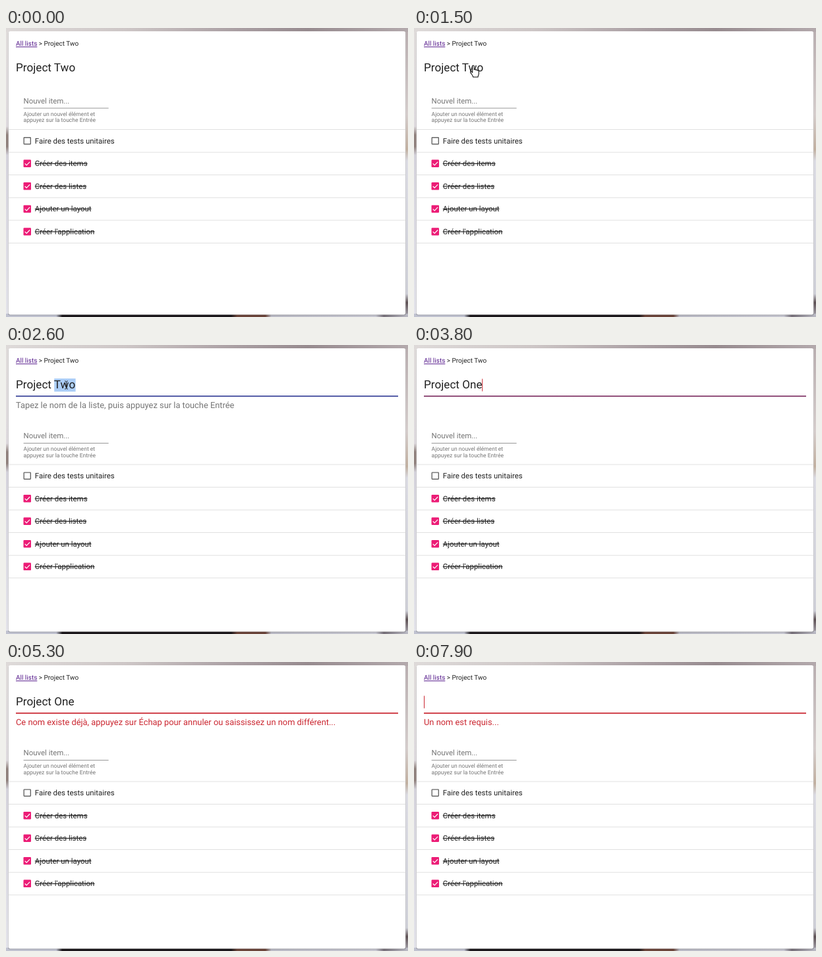
An HTML page that plays this animation: 610x440 px, repeating every 8 s.

```html
<!DOCTYPE html>
<html lang="fr">
<head>
<meta charset="utf-8">
<title>Liste</title>
<style>
html, body { margin: 0; width: 100%; height: 100%; overflow: hidden; }
svg {
  display: block; width: 100vw; height: 100vh;
  background:
    linear-gradient(90deg, #dedad9, #cdc6c6 30%, #a99ea2 58%, #978b8f 75%, #b3a9ac) 0 0 / 100% 6px no-repeat,
    linear-gradient(90deg, #c0c2d0 0 12.5%, #1b171b 14% 56%, #6b4439 57.5% 64.5%, #b9b9c4 66%, #c6c6d0 92%, #77707a 94%, #bcbcc6) 0 100% / 100% 5px no-repeat,
    linear-gradient(#e0dcdb, #dedade 34%, #91827e 37% 41%, #d5d3dc 44%, #e3e3ea) 0 0 / 8px 100% no-repeat,
    linear-gradient(#b9aeb0, #d6cecd 30%, #c2b0a0 42%, #dcdce4 46%, #cfd0d8 92%, #5d5053 95%, #b0aeb8) 100% 0 / 8px 100% no-repeat;
}
text { font-family: Roboto, sans-serif; fill: #212121; white-space: pre; text-rendering: geometricPrecision; }
.small { font-size: 10px; }
.title { font-size: 17.14px; }
.msg { font-size: 12.86px; }
.item { font-size: 11.43px; }
.tip { font-size: 8.57px; fill: #757575; }
.grey { fill: #757575; }
.done { text-decoration: line-through; }
</style>
</head>
<body>
<svg id="stage" viewBox="0 0 610 440" preserveAspectRatio="none">
  <rect x="3.2" y="5.6" width="603.6" height="432" rx="3" fill="#000" opacity=".22"/>
  <rect x="3.7" y="5" width="602.6" height="431.4" rx="2.8" fill="#fff"/>

  <text class="small" x="15" y="27.3"><tspan fill="#551a8b" text-decoration="underline">All lists</tspan> &gt; Project Two</text>

  <rect id="select" y="51" height="20" fill="#accef7"/>
  <text id="title" class="title" x="15" y="66"></text>
  <rect id="caret" y="51.5" width="1" height="19"/>

  <g id="field">
    <rect x="15" y="77.2" width="580" height="1" fill="#949494"/>
    <rect id="ripple" y="77" height="1.7"/>
    <text id="hint" class="msg grey" x="15">Tapez le nom de la liste, puis appuyez sur la touche Entrée</text>
    <text id="error" class="msg" x="15" style="fill:#cb2731"></text>
  </g>

  <g id="list">
    <text class="item grey" x="26.6" y="114.6">Nouvel item...</text>
    <rect x="26.6" y="121.6" width="129" height=".9" fill="#8c8c8c"/>
    <text class="tip" x="26.6" y="133.7">Ajouter un nouvel élément et</text>
    <text class="tip" x="26.6" y="143.2">appuyez sur la touche Entrée</text>
  </g>

  <path id="arrow" d="M0 0V13L3 10.2L5 14.8L7.2 13.9L5.2 9.4H9.4Z" fill="#000" stroke="#fff" stroke-width=".8"/>
  <path id="hand" d="M-1.3 .8C-1.3 -.9 1.3 -.9 1.3 .8V6C2 5.2 3.5 5.4 3.8 6.5C4.6 5.8 6 6.1 6.2 7.3C7.3 6.8 8.3 7.3 8.3 8.5V12C8.3 14 7 15 7 17.3H-.2C-.6 15 -2.2 13.6 -4.2 10.4C-5 9 -3.4 8 -2.4 9.2L-1.3 10.4Z" fill="#fff" stroke="#111" stroke-width="1.1" stroke-linejoin="round"/>
  <path id="beam" d="M-2.4 -6C-1 -6 0 -5.6 0 -4.6C0 -5.6 1 -6 2.4 -6M0 -4.6V4.6M-2.4 6C-1 6 0 5.6 0 4.6C0 5.6 1 6 2.4 6M-1.4 1.8H1.4" fill="none" stroke="#222" stroke-width="1"/>
</svg>
<script>
const LOOP = 8000, LEFT = 15, RIGHT = 595;
const EDIT = 1550, FOCUS = 1660, PICK = 2320;
const INDIGO = [60, 70, 156], RED = [205, 40, 50];
const OLD = 'Project Two', NEW = 'Project One';
const TAKEN = 'Ce nom existe déjà, appuyez sur Échap pour annuler ou saississez un nom différent...';
const EMPTY = 'Un nom est requis...';

// Keystrokes: [time, resulting text]
const keys = [[3350, 'Project O'], [3550, 'Project On'], [3750, NEW], [5850, NEW.slice(0, -1)]];
for (let n = 9; n >= 0; n--) keys.push([6250 + (9 - n) * 44, NEW.slice(0, n)]);
const TYPED = keys[0][0], CLASH = keys[2][0], CLEAR = keys[3][0], BLANK = keys[keys.length - 1][0];

// Pointer path: [time, x, y]
const path = [[100, 318, 442], [480, 248, 258], [680, 248, 258], [1020, 90, 57.5]];

const $ = id => document.getElementById(id);
const clamp = v => Math.max(0, Math.min(1, v));
const part = (t, start, span = 300) => clamp((t - start) / span);
const easeOut = p => 1 - (1 - p) ** 3.6;
const easeIn = p => p ** 3;
const mix = (a, b, p) => a + (b - a) * p;
const set = (el, attrs) => { for (const k in attrs) el.setAttribute(k, attrs[k]); };
const show = (el, on) => set(el, { visibility: on ? 'visible' : 'hidden' });

function add(parent, tag, attrs, text = '') {
  const el = document.createElementNS('http://www.w3.org/2000/svg', tag);
  set(el, attrs);
  el.textContent = text;
  parent.append(el);
}

const items = ['Faire des tests unitaires', 'Créer des items', 'Créer des listes', 'Ajouter un layout', "Créer l'application"];

function buildList() {
  const list = $('list'), pitch = 34.55;
  for (let i = 0; i <= items.length; i++)
    add(list, 'rect', { x: 3.7, y: 154.2 + i * pitch, width: 602.6, height: .8, fill: '#d9d9d9' });
  items.forEach((name, i) => {
    const y = 166 + i * pitch;
    if (i) {
      add(list, 'rect', { x: 26.5, y, width: 11.5, height: 11.5, rx: 1.2, fill: '#ec1c76' });
      add(list, 'path', { d: `M28.7 ${y + 5.9}l2.5 2.5l4.9 -5.1`, fill: 'none', stroke: '#fff', 'stroke-width': 1.2 });
    } else {
      add(list, 'rect', { x: 27.2, y: y + .7, width: 10.1, height: 10.1, rx: .6, fill: 'none', stroke: '#666', 'stroke-width': 1.4 });
    }
    add(list, 'text', { x: 43.8, y: y + 9.6, class: i ? 'item done' : 'item' }, name);
  });
}

function textWidth(text) {
  $('title').textContent = text;
  return text ? $('title').getComputedTextLength() : 0;
}

function pointer(t) {
  let i = 0;
  while (i < path.length - 2 && t >= path[i + 1][0]) i++;
  const [a, b] = [path[i], path[i + 1]];
  const p = part(t, a[0], b[0] - a[0]), s = p * p * (3 - 2 * p);
  return [mix(a[1], b[1], s), mix(a[2], b[2], s)];
}

function drawPointer(t) {
  const [x, y] = pointer(t), over = y < 80;
  set($('arrow'), { transform: `translate(${x} ${y})` });
  set($('hand'), { transform: `translate(${x} ${y})` });
  set($('beam'), { transform: 'translate(91.5 61)' });
  show($('arrow'), t >= 100 && t < EDIT && !over);
  show($('hand'), t < EDIT && over);
  show($('beam'), t >= EDIT && t < TYPED);
}

function drawMessage(el, p) {
  const k = easeIn(p);
  set(el, { y: 96.3 - 14 * (1 - k), opacity: k });
}

function draw(t) {
  const editing = t >= EDIT, focused = t >= FOCUS;
  const key = keys.filter(k => k[0] <= t).pop();
  const text = key ? key[1] : OLD;

  show($('field'), editing);
  set($('list'), { transform: `translate(0 ${editing ? 27.4 : 0})` });

  // Focus line grows from the middle and turns red on an error
  const grow = focused ? mix(.5, 1, easeOut(part(t, FOCUS))) : 0;
  const wrong = easeOut(part(t, CLASH)) - easeOut(part(t, CLEAR)) + easeOut(part(t, BLANK));
  const color = `rgb(${INDIGO.map((v, i) => Math.round(mix(v, RED[i], wrong)))})`;
  const half = (RIGHT - LEFT) / 2 * grow;
  set($('ripple'), { x: (LEFT + RIGHT) / 2 - half, width: 2 * half, fill: color, opacity: part(t, FOCUS, 100) });

  const bad = t >= BLANK || (t >= CLASH && t < CLEAR);
  $('error').textContent = t >= BLANK ? EMPTY : TAKEN;
  drawMessage($('error'), bad ? part(t, t >= BLANK ? BLANK : CLASH) : 0);
  drawMessage($('hint'), bad ? 0 : t < CLASH ? 1 : part(t, CLEAR));

  const picked = t >= PICK && t < TYPED;
  const from = textWidth('Project ');
  set($('select'), { x: LEFT + from, width: textWidth('Two') });
  show($('select'), picked);

  // Caret restarts its blink at every keystroke
  const since = t - (key ? key[0] : FOCUS);
  const at = textWidth(key ? text : 'Project Tw');
  set($('caret'), { x: LEFT + Math.max(0, at - .3), fill: bad ? '#cb2731' : color });
  show($('caret'), focused && !picked && since % 1000 < 500);

  $('title').textContent = text;
  drawPointer(t);
}

buildList();
const start = performance.now();
function tick() {
  draw((performance.now() - start) % LOOP);
  requestAnimationFrame(tick);
}
tick();
</script>
</body>
</html>
```
